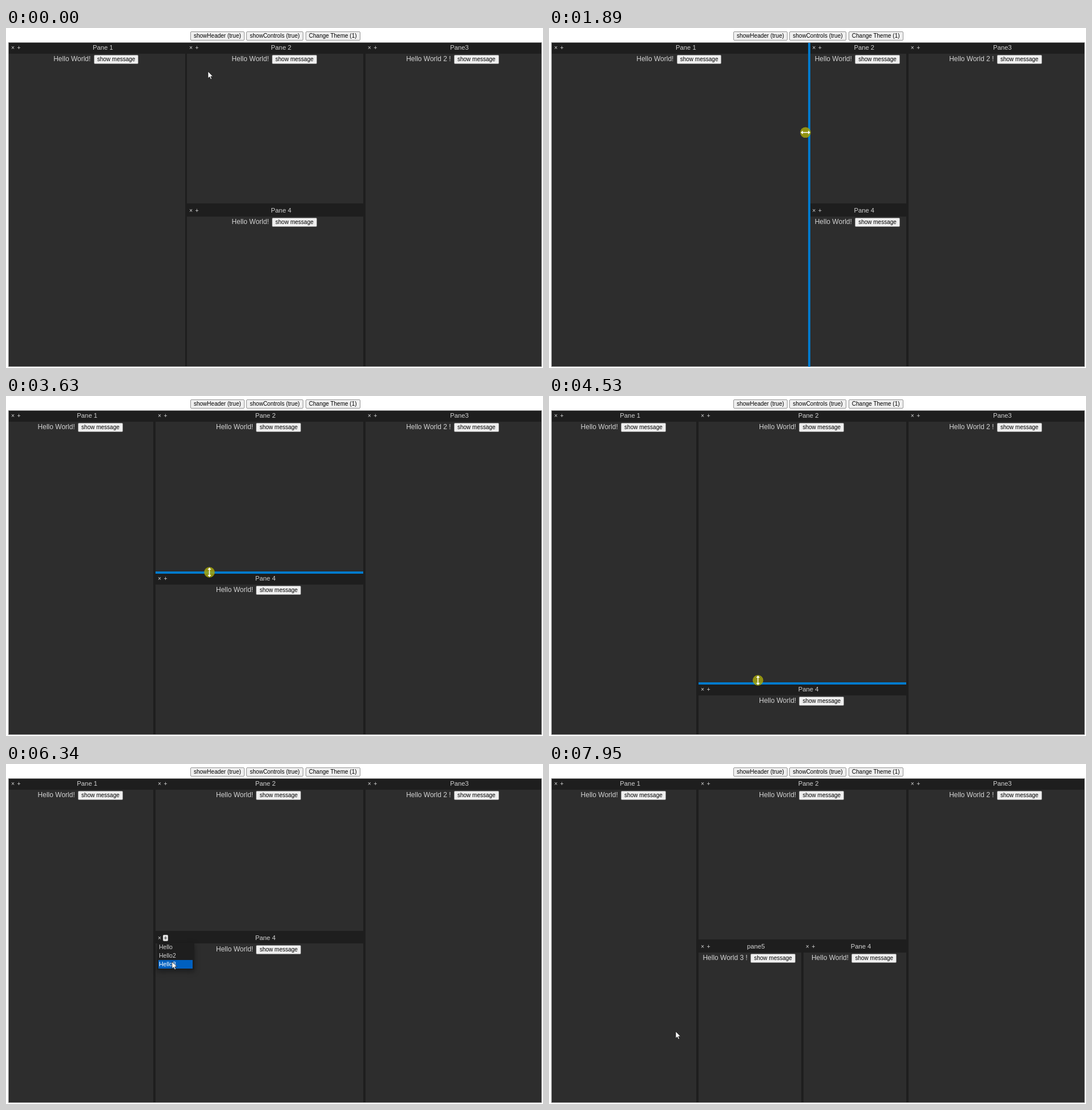
Recreate the animation shown at these times as an HTML page. Size 941 px wide and 595 px high, loop 8 s.

```html
<!DOCTYPE html>
<html lang="en">
<head>
<meta charset="utf-8">
<title>Split panes</title>
<style>
  html, body { margin: 0; width: 100%; height: 100%; overflow: hidden; background: #fff; }
  body { position: relative; font: 12px/12px "Liberation Sans", Arial, sans-serif; color: #d2d2d2; cursor: default; }
  .frame { position: absolute; left: 4px; top: 25px; width: 935px; height: 568px; box-sizing: border-box;
    border: 1px solid #888; background: #1e1e1e; }
  .btn { display: inline-block; box-sizing: border-box; height: 16px; padding: 0 5px; border: 1px solid #949494;
    border-radius: 2px; background: #efefef; color: #000; font-size: 10px; line-height: 14px; white-space: nowrap; }
  .bar .btn { position: absolute; top: 6px; }
  .pane { position: absolute; background: #1e1e1e; overflow: hidden; }
  .title { position: absolute; left: 21px; right: 0; top: 1px; text-align: center; font-size: 11.25px; line-height: 14px; }
  .ctl { position: absolute; top: 3px; width: 9px; height: 11px; border-radius: 2px; text-align: center;
    font-size: 10.5px; line-height: 11px; }
  .close { left: 2.5px; }
  .add { left: 13px; }
  .add.on { background: #dedede; color: #222; }
  .body { position: absolute; left: 0; right: 0; top: 18.5px; bottom: 0; padding-top: 2.5px; background: #2d2d2d;
    text-align: center; white-space: nowrap; }
  .body .btn { margin: 0 3px 0 2px; }
  .sash { position: absolute; background: #007acc; }
  #menu { position: absolute; left: 265px; top: 313px; width: 65px; height: 47px; background: #1e1e1e;
    box-shadow: 0 3px 9px rgba(0, 0, 0, .4); font-size: 10.5px; line-height: 15px; }
  #menu div { margin: 0 3px 0 2px; height: 15px; padding-left: 1px; }
  #menu .on { background: #0060c0; color: #fff; }
  #pointer { position: absolute; left: 0; top: 0; overflow: visible; }
</style>
</head>
<body>
<div class="bar">
  <span class="btn" style="left:323px">showHeader (true)</span>
  <span class="btn" style="left:421.3px">showControls (true)</span>
  <span class="btn" style="left:524.8px">Change Theme (1)</span>
</div>
<div class="frame"></div>
<div id="panes"></div>
<div class="sash" id="sashV"></div>
<div class="sash" id="sashH"></div>
<div id="menu"><div>Hello</div><div>Hello2</div><div>Hello3</div></div>
<svg id="pointer" width="1" height="1">
  <circle id="halo" cx=".5" cy=".5" r="9.3" fill="#a8a80a" fill-opacity=".82"/>
  <path id="arrow" d="M0 0V12L2.8 9.5 4.7 13.8 6.6 13 4.8 8.8H8.6Z" fill="#fff" stroke="#111" stroke-width=".7"/>
  <path id="resize" d="M-8.3 0L-4.6-3.2V-.8H4.6V-3.2L8.3 0 4.6 3.2V.8H-4.6V3.2Z" fill="#fff"/>
</svg>
<script>
const LOOP = 8000, LEFT = 5, RIGHT = 938, TOP = 26, BOTTOM = 592;
const GAP = 1.8, COL = 628, ROW = 309, LAG = 30;
const DRAG_X = [660, 2430], DRAG_Y = [3630, 5050], MENU = [5680, 6580];
const $ = id => document.getElementById(id);

// Pointer strokes: each eases from the previous place to x, y
const start = { x: 354, y: 76 };
const strokes = [
  { from: 60, to: 300, x: 316, y: 172 },
  { from: 660, to: 1200, x: 488, y: 178 },
  { from: 1250, to: 1770, x: 465, y: 182 },
  { from: 1780, to: 2430, x: 258, y: 186 },
  { from: 2560, to: 3040, x: 356, y: 308 },
  { from: 3630, to: 4250, x: 366, y: 508 },
  { from: 4450, to: 5050, x: 360, y: 287 },
  { from: 5060, to: 5340, x: 352, y: 275 },
  { from: 5350, to: 5620, x: 279, y: 300 },
  { from: 5750, to: 6120, x: 291, y: 346 },
  { from: 7000, to: 7380, x: 262, y: 526 },
  { from: 7500, to: 7780, x: 222, y: 468 },
];

const clamp = (v, lo, hi) => Math.min(hi, Math.max(lo, v));
const ramp = (t, a, b) => clamp((t - a) / (b - a), 0, 1);
const ease = u => u * u * (3 - 2 * u);
const within = (t, a, b) => t >= a && t < b;
const show = (el, on) => { el.style.display = on ? "" : "none"; };

function pointerAt(t) {
  let { x, y } = start;
  for (const s of strokes) {
    const k = ease(ramp(t, s.from, s.to));
    x += (s.x - x) * k;
    y += (s.y - y) * k;
  }
  return { x, y };
}

// A sash trails the pointer during its drag, within its limits
const dragged = (t, drag) => pointerAt(clamp(t - LAG, ...drag));
const sashX = t => clamp(dragged(t, DRAG_X).x - 0.6, 260.2, 472);
const sashY = t => clamp(dragged(t, DRAG_Y).y + 1, 293.4, 503);

function box(el, x0, y0, x1, y1) {
  el.style.left = x0 + "px";
  el.style.top = y0 + "px";
  el.style.width = x1 - x0 + "px";
  el.style.height = y1 - y0 + "px";
}

function makePane(title, text) {
  const el = document.createElement("div");
  el.className = "pane";
  el.innerHTML = `<div class="ctl close">×</div><div class="ctl add">+</div><div class="title">${title}</div>
    <div class="body">${text} <span class="btn">show message</span></div>`;
  $("panes").append(el);
  return el;
}

const pane1 = makePane("Pane 1", "Hello World!");
const pane2 = makePane("Pane 2", "Hello World!");
const pane3 = makePane("Pane3", "Hello World 2 !");
const pane4 = makePane("Pane 4", "Hello World!");
const pane5 = makePane("pane5", "Hello World 3 !");
const plus = pane4.querySelector(".add");
const rows = [...$("menu").children];

function draw(t) {
  const split = t >= MENU[1];
  const x = sashX(t), y = split ? ROW : sashY(t), low = y + 2.2;
  const mid = (x + COL) / 2;
  const p = pointerAt(t);

  box(pane1, LEFT, TOP, x - GAP, BOTTOM);
  box(pane2, x + GAP, TOP, COL - GAP, y - GAP);
  box(pane3, COL + GAP, TOP, RIGHT, BOTTOM);
  box(pane4, (split ? mid : x) + GAP, low, COL - GAP, BOTTOM);
  box(pane5, x + GAP, low, mid - GAP, BOTTOM);
  show(pane5, split);

  box($("sashV"), x - 2, TOP, x + 2, BOTTOM + 1);
  box($("sashH"), x + GAP, y - GAP, COL - GAP, y + GAP);
  $("sashV").style.opacity = ramp(t, 360, 480) - ramp(t, 2500, 2600);
  $("sashH").style.opacity = ramp(t, 3180, 3400) - ramp(t, 5080, 5200);

  const open = within(t, ...MENU);
  show($("menu"), open);
  rows.forEach((row, i) => row.classList.toggle("on", within(p.y, 313 + 15 * i, 328 + 15 * i)));
  plus.classList.toggle("on", within(t, MENU[0] - 90, MENU[1]));

  const overV = within(t, 290, 2540), overH = within(t, 3040, 5090);
  const dragging = within(t, 440, 2460) || within(t, 3400, 5060);
  const clicking = MENU.some(at => Math.abs(t - at) < 40);
  $("pointer").style.transform = `translate(${p.x}px, ${p.y}px)`;
  show($("halo"), dragging || clicking);
  show($("arrow"), !overV && !overH);
  show($("resize"), overV || overH);
  $("resize").setAttribute("transform", `translate(.5 .5) rotate(${overH ? 90 : 0})`);
}

const began = performance.now();
function tick() {
  draw((performance.now() - began) % LOOP);
  requestAnimationFrame(tick);
}
tick();
</script>
</body>
</html>
```
